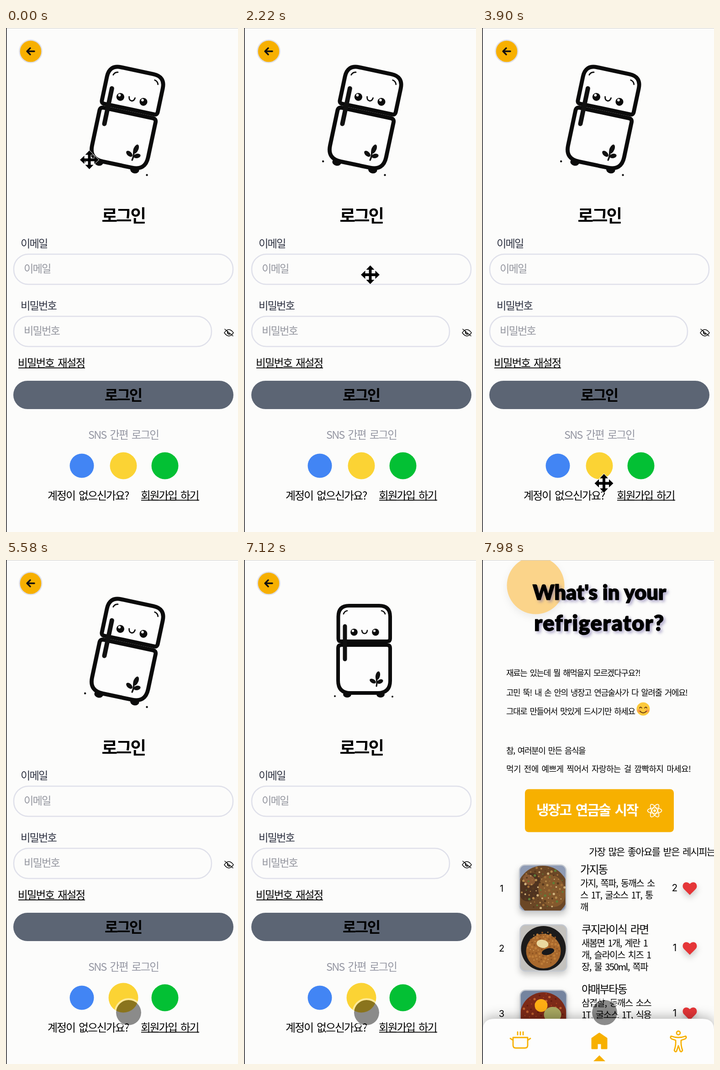
These frames come from a looping animation (508 px wide and 1103 px high, 8000 ms). An HTML page:

```html
<!DOCTYPE html>
<html lang="ko">
<head>
<meta charset="utf-8">
<style>
html, body { margin: 0; width: 100%; height: 100%; overflow: hidden; background: #fcfcfb; }
svg { display: block; width: 508px; height: 1103px; }
text { font-family: "Noto Sans CJK KR", "Noto Sans CJK", sans-serif; white-space: pre; }
.ko { letter-spacing: -.08em; word-spacing: .14em; }
.ui { font-family: Inter, sans-serif; }
.title {
  font: 900 45px Lato, sans-serif; text-anchor: middle;
  stroke: #000; stroke-width: 1.4; stroke-linejoin: round;
  filter: drop-shadow(4px 4px 3px #6a60a088);
}
.line { fill: none; stroke-linecap: round; stroke-linejoin: round; }
.soft { filter: drop-shadow(0 7px 7px #0003); }
</style>
</head>
<body>
<svg id="stage" viewBox="0 0 508 1103"></svg>
<script>
const AMBER = '#f7b000';

// Text whose glyphs are centred on height y
const ko = (s, x, y, size = 23.5, fill = '#000', weight = 300, extra = '') =>
  `<text class="ko" x="${x}" y="${y + size * .38}" font-size="${size}" font-weight="${weight}" fill="${fill}" ${extra}>${s}</text>`;
const ui = (s, x, y, size = 20) =>
  `<text class="ui" x="${x}" y="${y + size * .36}" font-size="${size}" text-anchor="middle">${s}</text>`;
const circle = (x, y, r, fill, extra = '') => `<circle cx="${x}" cy="${y}" r="${r}" fill="${fill}" ${extra}/>`;
const oval = (x, y, rx, ry, turn, extra) =>
  `<ellipse rx="${rx}" ry="${ry}" transform="translate(${x} ${y}) rotate(${turn})" ${extra}/>`;
const box = (x, y, w, h, r, extra) => `<rect x="${x}" y="${y}" width="${w}" height="${h}" rx="${r}" ${extra}/>`;
const line = (d, color, width, extra = '') => `<path class="line" d="${d}" stroke="${color}" stroke-width="${width}" ${extra}/>`;
const group = (id, body, extra = '') => `<g id="${id}" ${extra}>${body}</g>`;

const eye = x => circle(x, 158, 7.8, '#0b0b0b') + circle(x - 2.5, 155, 2.6, '#fff');
const fridge = group('fridge',
  oval(226, 294, 9, 7, 0, 'fill="#0b0b0b"') + oval(299, 294, 9, 7, 0, 'fill="#0b0b0b"') +
  circle(199, 298, 2, '#111') + circle(325, 299, 2, '#111') +
  line('M206.5 172V124Q206.5 100 230 100H296Q320 100 320 124V172Q320 178 314 178H212Q206.5 178 206.5 172Z', '#0b0b0b', 8, 'style="fill:#fdfdfd"') +
  line('M206 193Q206 186 213 186H313Q320 186 320 193V264Q320 291 293 291H233Q206 291 206 264Z', '#0b0b0b', 8, 'style="fill:#fdfdfd"') +
  line('M221 145V217', '#111', 9) +
  line('M218 118Q220 112 226 111M301 111Q307 112 309 118', '#111', 2.6) +
  eye(241) + eye(288) + line('M258 154Q259 161 264 161Q269 161 270 154', '#111', 2.6) +
  line('M290 276Q292 268 290 260', '#111', 3.2) +
  oval(293, 253, 4.8, 9.5, 12, 'fill="#111"') + oval(282, 265, 7.5, 4.4, 30, 'fill="#111"') +
  oval(298, 266, 7, 4.4, -25, 'fill="#111"'));

const field = w => y => box(17, y, w, 66, 32, 'fill="none" stroke="#dfe0ea" stroke-width="2.5"');
const login = group('login',
  circle(54, 51, 24.5, AMBER, 'stroke="#dfdfe6" stroke-width="2.5"') +
  line('M62 51H46M53 44L46 51L53 58', '#111', 3.4) +
  fridge +
  ko('로그인', 209.5, 410, 37.5, '#000', 900) +
  ko('이메일', 32, 471, 23.2, '#2c3040') + field(480)(495) + ko('이메일', 39, 526, 23.2, '#94969f') +
  ko('비밀번호', 32, 607, 23.2, '#2c3040') + field(433)(631) + ko('비밀번호', 39, 662, 23.2, '#94969f') +
  line('M478 667Q488 653 498 667Q488 681 478 667ZM479 659L497 674', '#000', 1.4) +
  line('M485 664Q484 670 490 670', '#000', 2) +
  ko('비밀번호 재설정', 26, 733) + box(27, 743, 146, 1.8, 0, '') +
  box(16, 772, 482, 62, 31, 'fill="#5c6574"') +
  ko('로그인', 216, 803, 32, '#000', 900) +
  ko('SNS 간편 로그인', 180, 890, 23.5, '#9496a2') +
  circle(166, 958, 26.5, '#4285f4') + circle(257, 958, 29.5, '#fbd334', 'id="sns"') + circle(348, 958, 29.5, '#03c034') +
  ko('계정이 없으신가요?', 91, 1023, 23.8) + ko('회원가입 하기', 295, 1023) + box(296, 1032.5, 127, 1.8, 0, ''));

const header = group('header',
  circle(117.5, 195, 63, '#fbd48a', 'style="filter:drop-shadow(0 6px 8px #0001)"') +
  `<text class="title" x="257" y="226">What's in your</text>` +
  `<text class="title" x="257" y="294" style="font-size:47px;letter-spacing:.03em">refrigerator?</text>`);

const start = group('start',
  box(94, 808, 326, 94, 8, `fill="${AMBER}"`) +
  ko('냉장고 연금술 시작', 119, 853, 30, '#fff', 900) +
  [0, 60, 120].map(a => oval(378, 855, 15.5, 6, a, 'fill="none" stroke="#fff" stroke-width="1.7"')).join('') +
  circle(378, 855, 2.7, '#fff'));

const smiley = circle(353, 326, 14.5, '#fcc93c') +
  circle(344, 330, 3.5, '#f79a4a') + circle(362, 330, 3.5, '#f79a4a') +
  line('M345 324Q347 320 350 324M356 324Q359 320 361 324M346 331Q353 338 360 331', '#6b3f14', 1.8);

// Soft stand-ins for the three dish photos, centred on 0,0
const scatter = (n, spread, colors) => Array.from({length: n}, (_, i) => {
  const a = i * 2.4, r = spread * Math.sqrt((i + .5) / n);
  return circle((Math.cos(a) * r).toFixed(1), (Math.sin(a) * r).toFixed(1), 1.2 + i % 3 * .7, colors[i % colors.length]);
}).join('');
const backdrop = color => box(-54, -54, 108, 108, 0, `fill="${color}"`);
const dishes = [
  backdrop('#8f9bb4') + circle(0, 8, 57, '#6b4726') +
    oval(-28, -2, 23, 32, 20, 'fill="#4f3320"') + oval(-30, -18, 14, 11, 30, 'fill="#8a5a34"') +
    oval(20, 6, 29, 36, -20, 'fill="#84592d"') +
    scatter(90, 48, ['#b58a4c', '#5d7f38', '#593a1e', '#a06f38', '#d0b27c']),
  backdrop('#c4c2be') + circle(0, 1, 49, '#1c1b1b') + circle(0, 7, 38, '#a9692d') +
    scatter(80, 36, ['#cf9650', '#8f5522', '#bf7d38']) + oval(-2, -9, 13, 9, 10, 'fill="#ead9a0"') +
    oval(10, 8, 14, 7, -15, 'fill="#17181b"'),
  backdrop('#75849f') + circle(0, 5, 51, '#7d2a18') +
    scatter(60, 44, ['#ad4520', '#651c10', '#c0602e']) + oval(20, 3, 19, 17, 0, 'fill="#a9a962"') + circle(-5, -17, 14, '#fdae14')
];

const row = (n, x, y, title, lines, likes, top = y - 41) =>
  ui(n, 43, y + 1) +
  `<g class="soft"><g transform="translate(${n == 1 ? 133 : 134.5} ${y})"><g clip-path="url(#photo)">${dishes[n - 1]}</g>` +
  box(-51, -50.5, 102, 101, 12, 'fill="none" stroke="#c3c8d0" stroke-width="2.5"') + '</g></g>' +
  ko(title, x, top, 23.5) +
  lines.map((s, i) => ko(s, x, top + 30 + i * 26, 20)).join('') +
  ui(likes, 422, y - 1, 21) +
  `<path class="soft" fill="#e53638" transform="translate(455 ${y})" d="M0 15L-13 2C-20 -6 -11 -19 0 -9C11 -19 20 -6 13 2Z"/>`;

const note = (s, y, extra) => ko(s, 53, y, 18, '#000', 500, extra);
const recipes = group('recipes',
  note('재료는 있는데 뭘 해먹을지 모르겠다구요?!', 247) +
  note('고민 뚝! 내 손 안의 냉장고 연금술사가 다 알려줄 거에요!', 290) +
  note('그대로 만들어서 맛있게 드시기만 하세요', 331) + smiley +
  note('참, 여러분이 만든 음식을', 417) +
  note('먹기 전에 예쁘게 찍어서 자랑하는 걸 깜빡하지 마세요!', 457, 'style="letter-spacing:-.035em"') +
  ko('가장 많은 좋아요를 받은 레시피는?', 234, 638, 21) +
  row(1, 215, 718, '가지동', ['가지, 쪽파, 동깨스 소', '스 1T, 굴소스 1T, 통', '깨'], 2) +
  row(2, 218, 849, '쿠지라이식 라면', ['새봄면 1개, 계란 1', '개, 슬라이스 치즈 1', '장, 물 350ml, 쪽파'], 1) +
  row(3, 218, 992, '야매부타동', ['삼겹살, 동깨스 소스', '1T, 굴소스 1T, 식용'], 1, 939));

const nav =
  '<path d="M2 1103V1028Q2 1004 28 1004H482Q508 1004 508 1028V1103Z" fill="#fdfdfd" style="filter:drop-shadow(0 -5px 12px #0004)"/>' +
  line('M68 1045H100V1062Q100 1068 94 1068H74Q68 1068 68 1062ZM68 1051L62 1047M100 1051L106 1047M78 1033V1039M84 1033V1039M90 1033V1039', AMBER, 2.8) +
  `<path fill="${AMBER}" stroke="${AMBER}" stroke-width="3" stroke-linejoin="round" d="M241 1047L257 1036L273 1047V1069H262V1058H252V1069H241Z"/>` +
  `<path fill="${AMBER}" d="M257 1084L270 1097H244Z"/>` +
  circle(430, 1035, 4, 'none', `stroke="${AMBER}" stroke-width="2.8"`) +
  line('M414 1042Q411 1045 415 1048L424 1051Q425 1062 421 1073Q423 1078 426 1075L430 1063L434 1075Q437 1078 439 1073Q435 1062 436 1051L445 1048Q449 1045 446 1042Q430 1048 414 1042Z', AMBER, 2.8);

const home = group('home', header + recipes + start + group('loading', ui('Loading...', 257, 939, 20.3)));
const touch = group('touch', circle(268.5, 990.5, 27.5, '#000', 'fill-opacity=".45"') +
  circle(268.5, 990.5, 29.5, 'none', 'stroke="#fff" stroke-opacity=".5" stroke-width="4"'));
const pointer = group('pointer',
  '<path stroke="#fff" stroke-width="1.6" paint-order="stroke" d="M0-20.5L9-11H3V-3H11V-9L20.5 0L11 9V3H3V11H9L0 20.5L-9 11H-3V3H-11V9L-20.5 0L-11-9V-3H-3V-11H-9Z"/>');

const $ = id => document.getElementById(id);
$('stage').innerHTML =
  `<clipPath id="photo">${box(-51, -50.5, 102, 101, 12, '')}</clipPath>` +
  box(0, 0, 508, 1103, 0, 'fill="#fcfcfb"') + login + home + group('nav', nav) + touch + pointer +
  box(0, 0, 508, 1, 0, 'fill="#cfcfcf"') + box(0, 0, 1.5, 1103, 0, 'fill="#17171c"');

const LOOP = 8000, TAP = 5200, LEAVE = 5610, OPEN = 7540, LOADED = 7840;
const path = [[0, 182.5, 288.5], [800, 186, 292], [1640, 255, 328], [2220, 276.5, 538.5],
  [2400, 274, 792], [2740, 268, 970], [3300, 267, 996.5], [LOOP, 267, 996.5]];

const ease = (t, from, span) => {
  const p = Math.min(1, Math.max(0, (t - from) / span));
  return p * p * (3 - 2 * p);
};
const show = (id, on) => $(id).setAttribute('display', on ? 'inline' : 'none');
const move = (id, value) => $(id).setAttribute('transform', value);

function pointerAt(t) {
  const i = path.findIndex(p => p[0] > t), [t0, x0, y0] = path[i - 1], [t1, x1, y1] = path[i];
  const p = (t - t0) / (t1 - t0);
  return `translate(${x0 + (x1 - x0) * p} ${y0 + (y1 - y0) * p})`;
}

function draw(t) {
  const tilt = 1 - ease(t, LEAVE, 350), loaded = t >= LOADED;
  show('login', t < OPEN);
  show('home', t >= OPEN);
  show('nav', t >= OPEN);
  show('recipes', loaded);
  show('loading', !loaded);
  show('pointer', t < TAP);
  show('touch', t >= TAP);
  move('fridge', `translate(257 204.5) rotate(${12 * tilt}) scale(${1 + .1 * tilt}) translate(-257 -204.5)`);
  $('sns').setAttribute('r', 29.5 * (1 + .1 * ease(t, TAP, 200)));
  move('header', `translate(0 ${loaded ? -139.5 : 0})`);
  move('start', `translate(0 ${loaded ? -306.5 : 0})`);
  move('pointer', pointerAt(t));
}

const begin = performance.now();
(function tick() {
  draw((performance.now() - begin) % LOOP);
  requestAnimationFrame(tick);
})();
</script>
</body>
</html>
```
